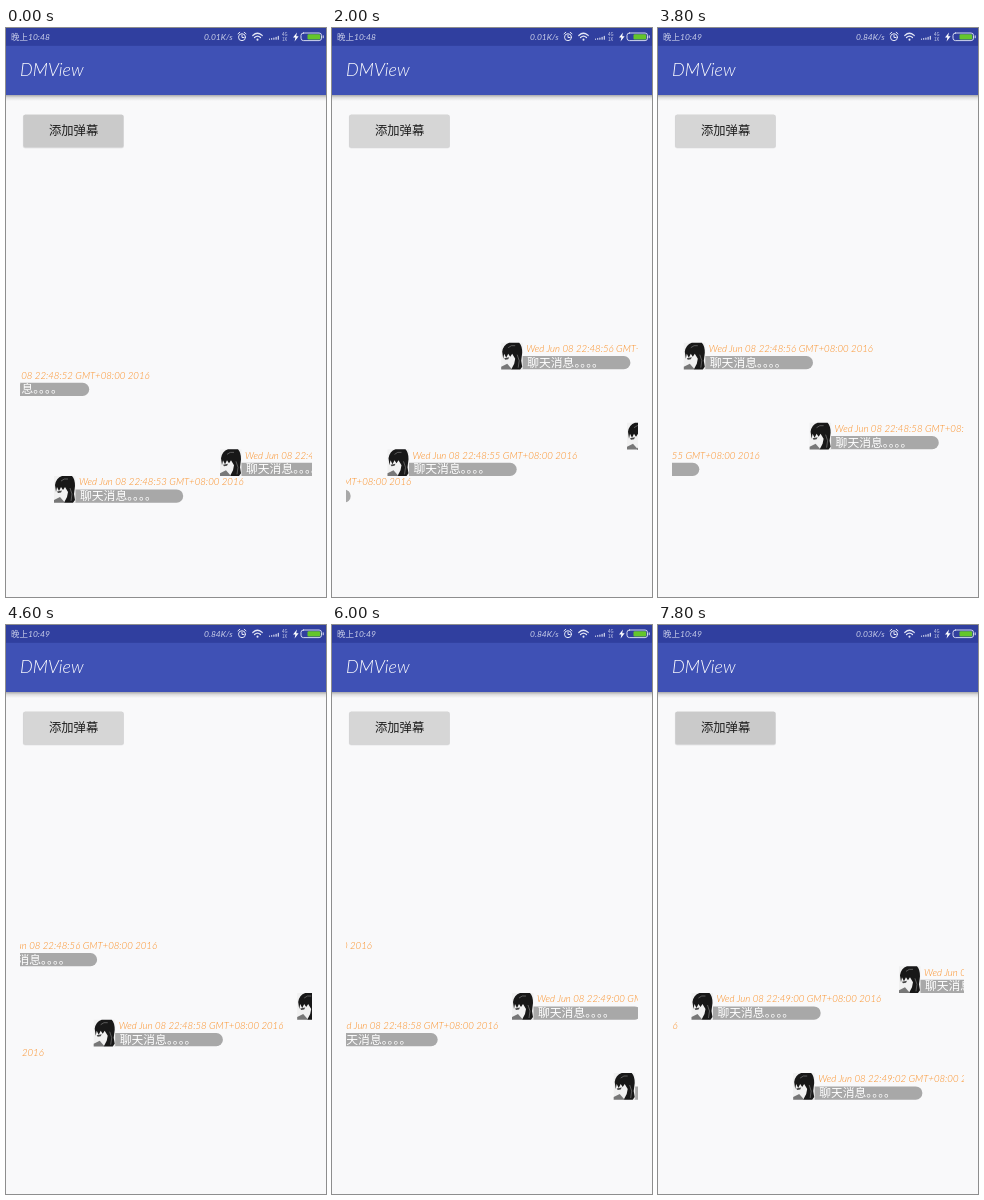
An HTML page for the animation above (8000 ms loop, 320x569 px).

```html
<!DOCTYPE html>
<html lang="zh-CN">
<head>
<meta charset="utf-8">
<title>DMView</title>
<style>
  html, body { margin: 0; width: 100%; height: 100%; overflow: hidden; background: #f9f9fa; }
  svg { display: block; width: 100%; height: 100%; }
  text { font-family: "Noto Sans CJK SC", "Noto Sans CJK", sans-serif; white-space: pre; }
  .latin { font-family: Lato, sans-serif; font-style: italic; }
  .status { font-size: 8.5px; fill: #c9cee9; }
  .title { font-size: 18px; font-weight: 300; fill: #fff; }
  .stamp { font-size: 9.65px; font-weight: 300; fill: #fa8a1c; }
  .msg { font-size: 11.8px; font-weight: 300; fill: #fff; }
</style>
</head>
<body>
<svg viewBox="0 0 320 569">
  <defs>
    <linearGradient id="shade" x2="0" y2="1">
      <stop offset="0" stop-color="#000" stop-opacity=".32"/>
      <stop offset=".45" stop-color="#000" stop-opacity=".1"/>
      <stop offset="1" stop-color="#000" stop-opacity="0"/>
    </linearGradient>
    <clipPath id="lane"><rect x="14" y="80" width="292" height="489"/></clipPath>
    <g id="avatar">
      <rect width="21.5" height="26.7" fill="#f1f1f1"/>
      <path d="M1 9Q2 2 8 0H18Q21 3 21 10L20 18 21 24 19 26.7H10L13 21 14 16 11 11 9 14 7 11 5 15 3 11 2 16Z" fill="#181818"/>
      <path d="M3 15.5 8 14.5 7 16.5 4 17Z" fill="#444"/>
      <path d="M0 24 6 21 11 26.7H0Z" fill="#777"/>
      <path d="M16 12 18 18 17 25M7 5Q10 2 14 3" fill="none" stroke="#777" stroke-width=".7"/>
    </g>
  </defs>

  <rect width="320" height="569" fill="#f9f9fa"/>
  <rect y="67" width="320" height="6" fill="url(#shade)"/>
  <rect width="320" height="67" fill="#3f51b5"/>
  <rect width="320" height="17.8" fill="#303f9f"/>
  <text class="latin title" x="14" y="48">DMView</text>

  <text class="status" x="5" y="12">晚上</text>
  <text class="status latin" id="clock" x="22" y="12"></text>
  <text class="status latin" id="speed" x="198" y="12"></text>
  <g fill="none" stroke="#e4e7f6" stroke-linecap="round">
    <circle cx="236" cy="9.2" r="3.5"/>
    <path d="M236 7V9.5H238M232 5.8 233.8 4.3M240 5.8 238.2 4.3"/>
    <path d="M246.8 7.5Q251.5 3 256.2 7.5M248.5 9.5Q251.5 6.8 254.5 9.5" stroke-width="1.2"/>
    <path d="M251.5 11.6V11.7" stroke-width="2"/>
    <path d="M263.5 11V11.3M265.7 10.6V11.3M267.9 10V11.3M270.1 9.2V11.3M272.3 8.2V11.3" stroke-width="1.1"/>
    <rect x="295" y="5" width="20.5" height="7.6" rx="2.4" stroke-width=".9"/>
    <path d="M317.2 7.8V9.8"/>
  </g>
  <rect x="301.5" y="6.2" width="12.8" height="5.2" rx="1.2" fill="#64c62b"/>
  <path d="M291 4.5 287 9.6H289.4L288.6 13.5 292.6 8.2H290.2Z" fill="#fff"/>
  <g font-size="4.4" fill="#d3d7ee"><text x="276" y="8">4G</text><text x="276" y="12.6">1X</text></g>

  <rect x="16.8" y="86.4" width="101.2" height="34.2" rx="2.4" fill="#000" opacity=".07"/>
  <rect x="17.2" y="86.8" width="100.4" height="33" rx="2" fill="#000" opacity=".1"/>
  <rect id="button" x="17.6" y="86.8" width="99.6" height="32.2" rx="1.6"/>
  <text x="43" y="107" font-size="12.3" fill="#1c1c1c">添加弹幕</text>

  <g id="items" clip-path="url(#lane)"></g>
</svg>
<script>
const LOOP = 8000, TICK = 200, EDGE = 306;
const $ = id => document.getElementById(id);

// time (s) and distance scrolled; the speed wavers slightly around 80 px/s
const scrollKeys = [[0, 0], [1.2, 93.7], [2, 158.5], [3, 238], [4.6, 365.8], [6, 477], [8, 639.8]];

// x at time zero, row, minute:second
const items = [
  [-46, 1, '48:52'], [48, 5, '48:53'], [214, 4, '48:55'],
  [327.7, 0, '48:56'], [453.5, 3, '48:58'], [657, 2, '49:00'],
  [758.7, 5, '49:02'], [864.5, 1, '49:03'], [952, 0, '49:04']
].map(([x, row, stamp]) => ({ x, y: 314.7 + row * 26.667, stamp }));

$('items').innerHTML = items.map(({ stamp }) => `<g>
  <path d="M20 13.4H122.6a6.6 6.6 0 0 1 0 13.2H20Z" fill="#a8a8a8"/>
  <use href="#avatar"/>
  <text class="latin stamp" x="25" y="9.2">Wed Jun 08 22:${stamp} GMT+08:00 2016</text>
  <text class="msg" x="26" y="24">聊天消息。。。。</text>
</g>`).join('');
const nodes = [...$('items').children];

function scrolled(t) {
  const i = scrollKeys.findIndex(k => k[0] > t);
  const [t0, s0] = scrollKeys[i - 1], [t1, s1] = scrollKeys[i];
  return s0 + (s1 - s0) * (t - t0) / (t1 - t0);
}

function draw(ms) {
  const now = Math.floor(ms % LOOP / TICK) * TICK;
  const shift = scrolled(now / 1000);
  let pressed = false;
  items.forEach(({ x, y }, i) => {
    const left = x - shift;
    // each press comes just before its message enters
    if (left >= EDGE && left < EDGE + 24) pressed = true;
    nodes[i].setAttribute('transform', `translate(${left.toFixed(2)} ${y.toFixed(2)})`);
  });
  $('button').setAttribute('fill', pressed ? '#cacaca' : '#d6d6d6');
  $('clock').textContent = now < 3800 ? '10:48' : '10:49';
  $('speed').textContent = (now < 2600 ? '0.01' : now < 6600 ? '0.84' : '0.03') + 'K/s';
}

const start = performance.now();
function loop() {
  draw(performance.now() - start);
  requestAnimationFrame(loop);
}
loop();
</script>
</body>
</html>
```
